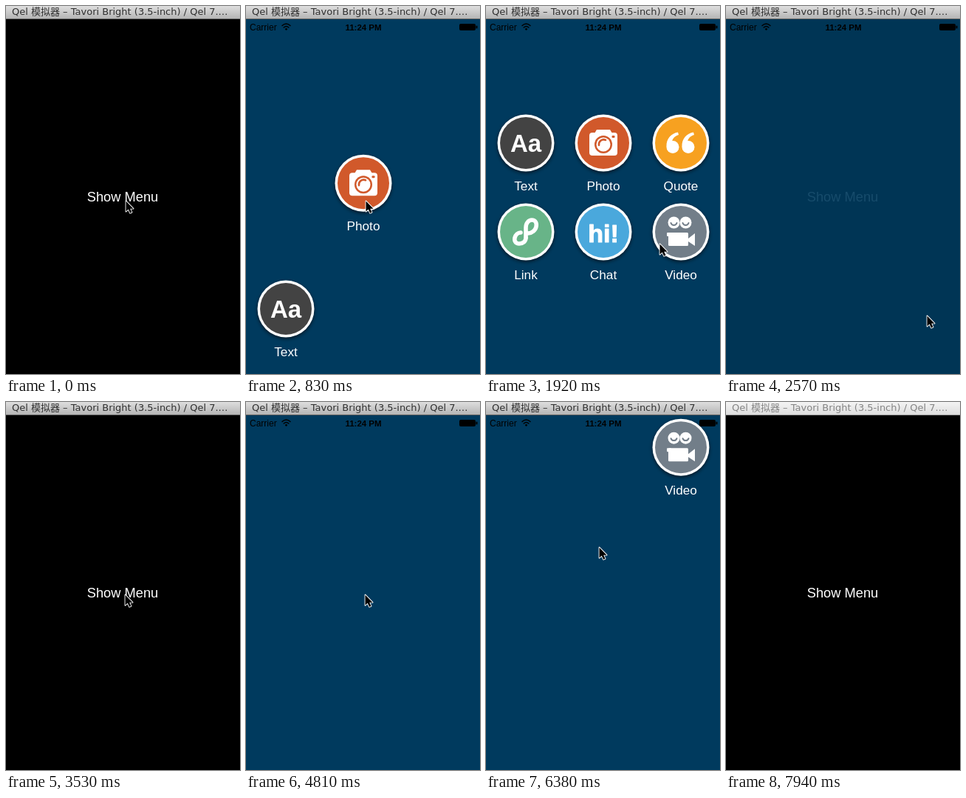
An HTML page with a canvas that plays this animation: 317x497 px, repeating every 8 s.

```html
<!DOCTYPE html>
<html lang="zh">
<head>
<meta charset="utf-8">
<title>Menu</title>
<style>
html, body { margin: 0; width: 100%; height: 100%; overflow: hidden; background: #000; }
canvas { display: block; width: 317px; height: 497px; }
</style>
</head>
<body>
<canvas id="stage" width="317" height="497"></canvas>
<script>
const ctx = document.getElementById('stage').getContext('2d');
const W = 317, H = 497, LOOP = 8000;
const SANS = '"Liberation Sans", Arial, sans-serif';
const BLUE = '#003a5e';
const WHITE = '#fff';
const RISE = 360, STEP = RISE / 5, UNIT = 198, FADE = 410;

// Each run of the menu: when it is shown, and when its parts start to move
const runs = [
  { on: 660, rise: 634, drop: 2022, fade: 2486 },
  { on: 4810, rise: 4810, drop: 5923, fade: 6387 }
];

// Pointer tracks: [time, x, y]
const tracks = [
  [[0, 162, 263], [1240, 162, 263], [1460, 162, 219], [1490, 159, 205], [1550, 150, 166],
   [1720, 150, 166], [1990, 264, 374], [2520, 266, 376], [2570, 272, 417], [2680, 284, 500]],
  [[3530, 161, 260], [4850, 161, 260], [5320, 186, 198], [5620, 186, 198], [5800, 153, 196],
   [6400, 153, 196], [6900, 239, 391], [7180, 239, 391], [7440, 261, 498]]
];

function bezier(x1, y1, x2, y2) {
  const at = (a, b, s) => 3 * a * s * (1 - s) ** 2 + 3 * b * s * s * (1 - s) + s ** 3;
  return x => {
    if (x <= 0) return 0;
    if (x >= 1) return 1;
    let lo = 0, hi = 1;
    for (let i = 0; i < 24; i++) {
      const mid = (lo + hi) / 2;
      if (at(x1, x2, mid) < x) lo = mid; else hi = mid;
    }
    return at(y1, y2, lo);
  };
}
const riseEase = bezier(0.45, 1.2, 0.75, 1);
const dropEase = bezier(0.3, 0.5, 0.7, 1);
const fadeEase = bezier(0.42, 0, 0.58, 1);

function disc(x, y, r, color) {
  ctx.fillStyle = color;
  ctx.beginPath();
  ctx.arc(x, y, r, 0, Math.PI * 2);
  ctx.fill();
}

function box(x, y, w, h, r, color) {
  ctx.fillStyle = color;
  ctx.beginPath();
  ctx.roundRect(x, y, w, h, r);
  ctx.fill();
}

function shape(d, color) {
  ctx.fillStyle = color;
  ctx.fill(new Path2D(d));
}

function line(d, width, color) {
  ctx.lineWidth = width;
  ctx.strokeStyle = color;
  ctx.lineCap = ctx.lineJoin = 'round';
  ctx.stroke(new Path2D(d));
}

function text(str, x, y, font, color, align = 'center') {
  ctx.font = font;
  ctx.fillStyle = color;
  ctx.textAlign = align;
  ctx.fillText(str, x, y);
}

function letters() {
  text('Aa', 0, 12, `bold 33px ${SANS}`, WHITE);
}

function camera(bg) {
  box(-19, -14, 38, 31, 4, WHITE);
  shape('M-12-13L-9-18H9L12-13Z', WHITE);
  box(11.5, -10, 4, 3, 1, bg);
  disc(0, 2, 12, bg);
  disc(0, 2, 9.5, WHITE);
  line('M-6 3A6.5 6.5 0 0 1 3-4', 2.6, bg);
}

function quotes() {
  for (const x of [-11, 10]) {
    disc(x, 5.5, 8.5, WHITE);
    shape(`M${x - 8.5} 5C${x - 9}-6 ${x - 2}-13 ${x + 7}-14.5L${x + 8}-11C${x + 2}-9 ${x}-6 ${x - 1}-2Z`, WHITE);
  }
}

function link() {
  line('M0 8V-6C0-12 4-16 8-16C13-16 15-12 14-7C13-2 8 2 3 2', 5.6, WHITE);
  line('M0 8C0 13-4 16-9 16C-14 16-16 12-15 8C-14 4-11 1-7 1', 5.6, WHITE);
}

function hello() {
  text('hi!', 0, 14, `bold 34px ${SANS}`, WHITE);
  ctx.lineWidth = 1;
  ctx.lineJoin = 'round';
  ctx.strokeStyle = WHITE;
  ctx.strokeText('hi!', 0, 14);
}

function film(bg) {
  for (const x of [-9.5, 6.5]) {
    disc(x, -12.5, 8, WHITE);
    line(`M${x - 4}-12A4.2 4.2 0 0 0 ${x + 4}-12`, 2, bg);
  }
  box(-17, 1, 27, 18, 1.5, WHITE);
  box(-19, 1, 6, 5, 1, WHITE);
  shape('M10 9L19 2V19L10 13Z', WHITE);
}

const items = [
  ['Text', '#434343', letters],
  ['Photo', '#d1592b', camera],
  ['Quote', '#f7a120', quotes],
  ['Link', '#68b488', link],
  ['Chat', '#4aa8dc', hello],
  ['Video', '#727e89', film]
];

function drawItem([label, color, glyph], x, y) {
  ctx.save();
  ctx.translate(x, y);
  ctx.save();
  ctx.shadowColor = 'rgba(0,0,0,.6)';
  ctx.shadowBlur = 5;
  ctx.shadowOffsetY = 2;
  disc(0, 0, 38.5, WHITE);
  ctx.restore();
  disc(0, 0, 35, color);
  glyph(color);
  text(label, 0, 64, `17.2px ${SANS}`, WHITE);
  ctx.restore();
}

function drawMenu(run, t) {
  items.forEach((item, i) => {
    const row = Math.floor(i / 3), col = i % 3;
    const delay = (row * 3 + [1, 0, 2][col]) * STEP;
    const up = riseEase((t - run.rise - delay) / RISE);
    const out = dropEase((t - run.drop - delay) / RISE);
    const y = 185 + row * 120 + (1 - up) * (4 - row) * UNIT - out * (row + 2) * UNIT;
    if (y > -80 && y < H + 50) drawItem(item, 54 + col * 105, y);
  });
}

function drawStatus() {
  const ink = '#000';
  text('Carrier', 5, 32.5, `12px ${SANS}`, ink, 'left');
  text('11:24 PM', 159, 32.5, `bold 11.5px ${SANS}`, ink);
  line('M49 26.5Q54.5 21.5 60 26.5M51.2 29Q54.5 26 57.8 29', 1.5, ink);
  disc(54.5, 31.3, 1.4, ink);
  box(289, 24, 22, 9, 2, ink);
  box(311.5, 26.5, 2, 4, 1, ink);
}

function drawTitle(active) {
  const g = ctx.createLinearGradient(0, 0, 0, 17);
  g.addColorStop(0, active ? '#dedede' : '#f4f4f4');
  g.addColorStop(1, active ? '#b5b5b5' : '#dedede');
  ctx.fillStyle = g;
  ctx.fillRect(0, 0, W, 17);
  ctx.fillStyle = active ? '#5c5c5c' : '#999';
  ctx.fillRect(0, 17, W, 1);
  text('Qel 模拟器 – Tavori Bright (3.5-inch) / Qel 7.…', 8, 12,
    '13px "DejaVu Sans", "Noto Sans CJK SC", "Noto Sans CJK", sans-serif',
    active ? '#303030' : '#858585', 'left');
}

function drawPointer(t) {
  const track = tracks.find(p => t >= p[0][0] && t < p[p.length - 1][0]);
  if (!track) return;
  const k = track.findIndex(p => p[0] > t);
  const [t0, x0, y0] = track[k - 1], [t1, x1, y1] = track[k];
  const f = (t - t0) / (t1 - t0);
  ctx.save();
  ctx.translate(Math.round(x0 + (x1 - x0) * f) + 0.5, Math.round(y0 + (y1 - y0) * f) + 0.5);
  const arrow = 'M0 0V14L3.2 11L5.6 16.2L8 15.1L5.7 10.2H10Z';
  line(arrow, 1.8, WHITE);
  shape(arrow, '#000');
  ctx.restore();
}

function draw(t) {
  ctx.fillStyle = '#000';
  ctx.fillRect(0, 0, W, H);
  text('Show Menu', 158, 264, `18.3px ${SANS}`, WHITE);
  const run = runs.find(r => t >= r.on && t < r.fade + FADE);
  if (run) {
    ctx.globalAlpha = 1 - fadeEase((t - run.fade) / FADE);
    ctx.fillStyle = BLUE;
    ctx.fillRect(0, 18, W, H - 18);
    ctx.globalAlpha = 1;
    drawStatus();
    drawMenu(run, t);
  }
  drawTitle(!(t >= 3510 && t < 3530) && t < 7940);
  drawPointer(t);
}

const begin = performance.now();
function tick() {
  draw((performance.now() - begin) % LOOP);
  requestAnimationFrame(tick);
}
tick();
</script>
</body>
</html>
```
